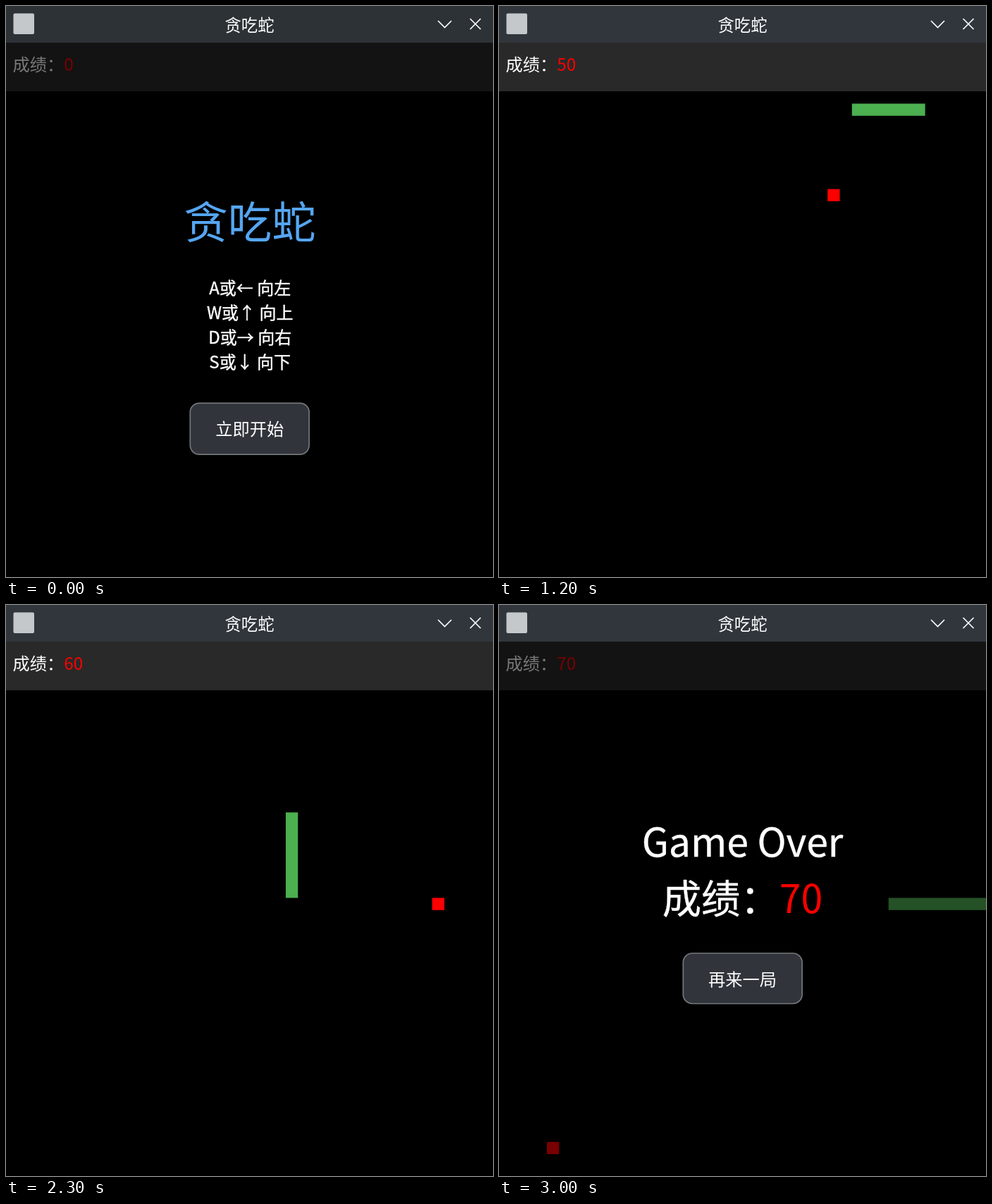
An HTML page that plays this animation: 691x810 px, repeating every 4100 ms.

```html
<!DOCTYPE html>
<html lang="zh-CN">
<head>
<meta charset="utf-8">
<title>贪吃蛇</title>
<style>
  html, body { margin: 0; width: 100%; height: 100%; overflow: hidden; background: #000; }
  svg { display: block; width: 691px; height: 810px; }
  text { font-family: "Noto Sans CJK SC", "Noto Sans CJK", sans-serif; font-size: 24.23px; fill: #fff; white-space: pre; }
  .mid { text-anchor: middle; }
  .red { fill: #f00; stroke: none; }
  .line { fill: none; stroke: #fcfcfc; stroke-width: 1.7; }
  .button { fill: #31353b; stroke: #73777b; stroke-width: 1.7; }
  .hover .button { fill: #344f5e; stroke: #3d9ff0; }
  .cells path { fill: none; stroke-width: 17.31; stroke-linecap: square; }
  .heavy { stroke: #fff; stroke-width: .4; }
  #help text { font-size: 24px; }
</style>
</head>
<body>
<svg viewBox="0 0 691 810" xmlns="http://www.w3.org/2000/svg">
  <rect width="691" height="810"/>
  <rect id="titleBar" width="691" height="52"/>
  <rect x="10.5" y="10.5" width="29.5" height="29.5" rx="2" fill="#c4c8ca"/>
  <text class="mid" x="345.5" y="35.5" style="font-size:23.3px">贪吃蛇</text>
  <path class="line" d="M613 21L622.5 30.5L632 21M658.5 18L673.5 33M673.5 18L658.5 33"/>

  <rect y="52" width="691" height="69" fill="#292929"/>
  <text x="9.6" y="91.7">成绩：<tspan id="score" class="red"></tspan></text>
  <g id="board" class="cells">
    <path id="food" stroke="#f00"/>
    <path id="snake" stroke="#4caf50"/>
  </g>
  <rect id="shade" y="52" width="691" height="758" opacity=".53"/>

  <g id="menu">
    <text class="mid" x="346" y="329.7" style="font-size:62.3px;fill:#55a6f2">贪吃蛇</text>
    <g id="help" class="heavy"></g>
    <g id="start">
      <rect class="button" x="261.3" y="563.3" width="168.8" height="72.8" rx="13"/>
      <text class="mid" x="345.8" y="609.3">立即开始</text>
    </g>
  </g>

  <g id="over">
    <g class="heavy">
      <text class="mid" x="345.5" y="356.7" style="font-size:55.4px">Game Over</text>
      <text class="mid" x="345.5" y="437" style="font-size:55.4px">成绩：<tspan class="red">70</tspan></text>
    </g>
    <rect class="button" x="261.3" y="494" width="168.8" height="71.5" rx="13"/>
    <text class="mid" x="345.5" y="539.7">再来一局</text>
  </g>

  <path id="cursor" d="M0 0V15.2L3.4 12.6L6.4 18L9.4 16.4L7.6 11.6L10 10.4Z"
        fill="#31363b" stroke="#e4e6e7" stroke-width="1.1" stroke-linejoin="round"/>
</svg>
<script>
const LOOP = 4100, STEP = 100;
const PLAY_AT = 1200, OVER_AT = 3000;
const CELL = 17.31, LEFT = -1.2, TOP = 121.2;
const MOVE_MS = 30.2, HEAD_AT_1500 = 29;

const $ = id => document.getElementById(id);
const show = (id, on) => $(id).setAttribute('display', on ? 'inline' : 'none');

$('help').innerHTML = ['A或← 向左', 'W或↑ 向上', 'D或→ 向右', 'S或↓ 向下']
  .map((s, i) => `<text class="mid" x="346.2" y="${408.8 + i * 35.2}">${s}</text>`).join('');

// Every cell the head visits, expanded from the turning points.
function trace(corners) {
  const cells = [corners[0]];
  for (const [cx, cy] of corners.slice(1)) {
    let [x, y] = cells[cells.length - 1];
    while (x !== cx || y !== cy) {
      x += Math.sign(cx - x);
      y += Math.sign(cy - y);
      cells.push([x, y]);
    }
  }
  return cells;
}

const route = trace([[15, 1], [39, 1], [39, 8], [23, 8], [23, 17], [39, 17]]);
const foods = [[27, 8], [35, 17], [4, 37]];
const eatenAt = foods.map(([fx, fy]) => route.findIndex(([x, y]) => x === fx && y === fy));

// A line through cell centres; its width and square caps fill the cells.
const center = ([x, y]) => `${LEFT + (x + .5) * CELL} ${TOP + (y + .5) * CELL}`;
const cellLine = cells => `M${center(cells[0])}L${cells.map(center).join('L')}`;

// Pointer keys: time, x, y
const pointer = [[300, 341, 764], [400, 344, 695], [500, 347, 636], [600, 349, 613], [700, 349, 613], [900, 360, 613]];

function pointerAt(t) {
  const i = pointer.findIndex(k => k[0] > t);
  if (i < 0) return pointer[pointer.length - 1].slice(1);
  const [a, b] = [pointer[i - 1], pointer[i]];
  const f = (t - a[0]) / (b[0] - a[0]);
  return [a[1] + (b[1] - a[1]) * f, a[2] + (b[2] - a[2]) * f];
}

function drawGame(t) {
  const head = Math.min(route.length - 1, HEAD_AT_1500 + Math.floor((t - 1500) / MOVE_MS));
  const eaten = eatenAt.filter(i => i >= 0 && i <= head).length;
  const length = 6 + eaten;
  $('snake').setAttribute('d', cellLine(route.slice(head - length + 1, head + 1)));
  $('food').setAttribute('d', cellLine([foods[eaten]]));
  $('score').textContent = 50 + eaten * 10;
}

function render(time) {
  const t = Math.floor((time % LOOP) / STEP) * STEP;
  const menu = t < PLAY_AT, over = t >= OVER_AT;
  const pointing = menu && t >= pointer[0][0];

  $('titleBar').setAttribute('fill', t < 900 ? '#2d3237' : '#31363d');
  show('menu', menu);
  show('over', over);
  show('shade', menu || over);
  show('board', !menu);
  show('cursor', pointing);

  if (menu) $('score').textContent = 0;
  else drawGame(t);

  let hover = false;
  if (pointing) {
    const [x, y] = pointerAt(t);
    $('cursor').setAttribute('transform', `translate(${x} ${y})`);
    hover = y <= 636;
  }
  $('start').setAttribute('class', hover ? 'hover' : '');
}

const origin = performance.now();
function tick() {
  render(performance.now() - origin);
  requestAnimationFrame(tick);
}
tick();
</script>
</body>
</html>
```
